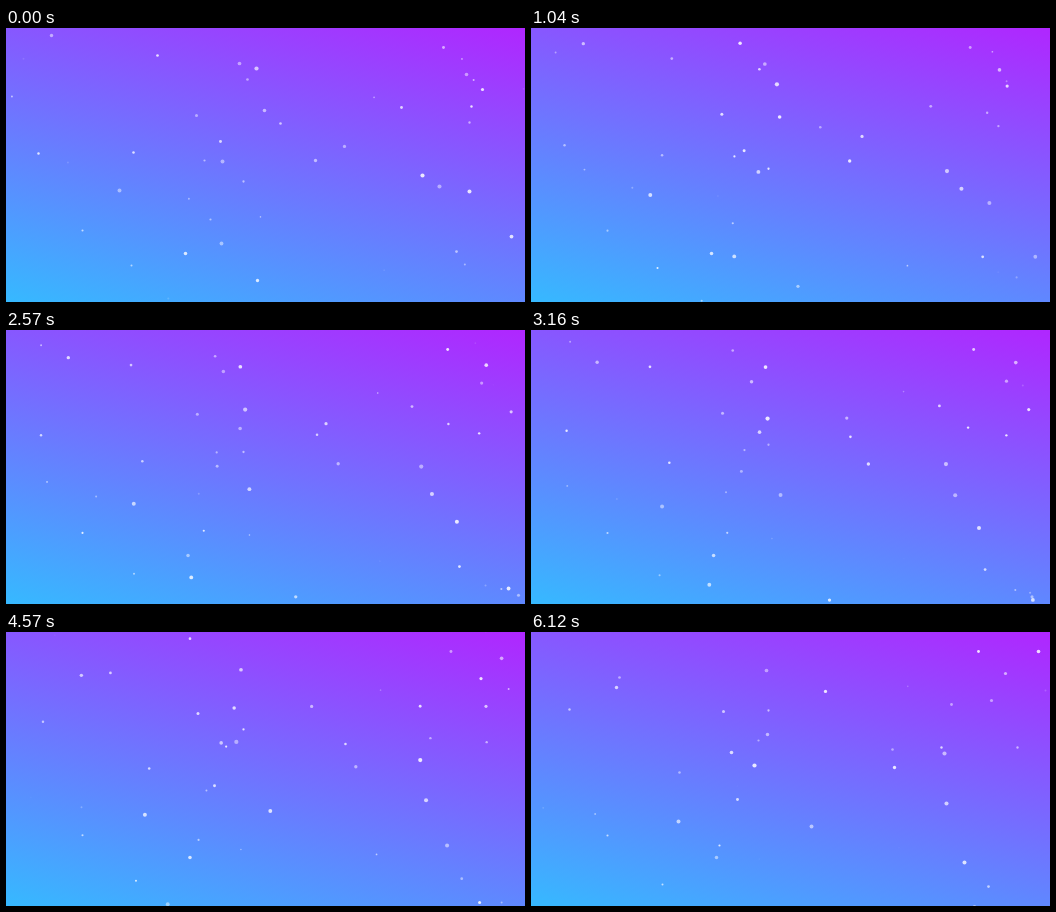
Write an HTML page with a canvas that moves like this. It is 519 by 274 pixels and loops after 6.19 s.

```html
<!DOCTYPE html>
<html lang="en">
<head>
<meta charset="utf-8">
<title>Drifting dots</title>
<style>
  html, body { margin: 0; width: 100%; height: 100%; overflow: hidden; }
  body { background: linear-gradient(15deg, #36b9ff, #b026ff); }
  canvas { display: block; }
</style>
</head>
<body>
<canvas id="stage" width="519" height="274"></canvas>
<script>
const LOOP = 6190, TRAVEL = 6120;
const ctx = document.getElementById('stage').getContext('2d');

// Straight drifts, largest dot first: start x, start y, end x, end y.
const drifts = [
  [250, 40, 223, 133], [416, 147, 413, 121], [433, 158, 415, 171],
  [463, 163, 433, 230], [113, 162, 147, 189], [216, 133, 280, 194],
  [215, 215, 143, 291], [505, 208, 498, 327], [233, 35, 235, 38],
  [460, 46, 507, 19], [258, 82, 200, 120], [179, 225, 185, 225],
  [203, -3, 236, 102], [45, 7, 85, 55], [309, 132, 363, 135],
  [251, 252, 342, 286], [338, 118, 294, 59], [476, 61, 474, 41],
  [537, 91, 460, 68], [562, 258, 443, 274], [190, 87, 192, 79],
  [214, 113, 206, 167], [437, 19, 447, 19], [395, 79, 420, 72],
  [450, 223, 457, 254], [151, 27, 88, 45], [241, 51, 164, -9],
  [274, 95, 361, 117], [127, 124, 148, 140], [32, 125, 38, 77],
  [465, 78, 410, 115], [463, 94, 486, 115], [237, 153, 237, 78],
  [198, 132, 227, 108], [204, 191, 188, 213], [76, 202, 76, 203],
  [125, 237, 131, 252]
];

let seed = 7;
const random = () => (seed = seed * 16807 % 2147483647) / 2147483647;

const makeDot = (path, radius, alpha, swing) => ({
  path, radius, alpha, swing, phase: random() * 6.28, rate: 1 + random() * 1.5
});

const dots = drifts.map((path, i) => makeDot(path, 2.1 - i * 0.03, 0.66, 0.2));

// Faint specks that fade in and out between the brighter dots.
for (let i = 0; i < 14; i++) {
  const x = random() * 519, y = random() * 274;
  const path = [x, y, x + random() * 100 - 50, y + random() * 100 - 50];
  dots.push(makeDot(path, 0.7 + random() * 0.4, 0.3, 0.3));
}

function draw() {
  const time = performance.now() % LOOP;
  const progress = time / TRAVEL;
  ctx.clearRect(0, 0, 519, 274);
  ctx.fillStyle = '#fff';
  for (const { path: [x0, y0, x1, y1], radius, alpha, swing, phase, rate } of dots) {
    ctx.globalAlpha = alpha + swing * Math.sin(phase + rate * time / 1000);
    ctx.beginPath();
    ctx.arc(x0 + (x1 - x0) * progress + 0.5, y0 + (y1 - y0) * progress + 0.5, radius, 0, 7);
    ctx.fill();
  }
  requestAnimationFrame(draw);
}
draw();
</script>
</body>
</html>
```
